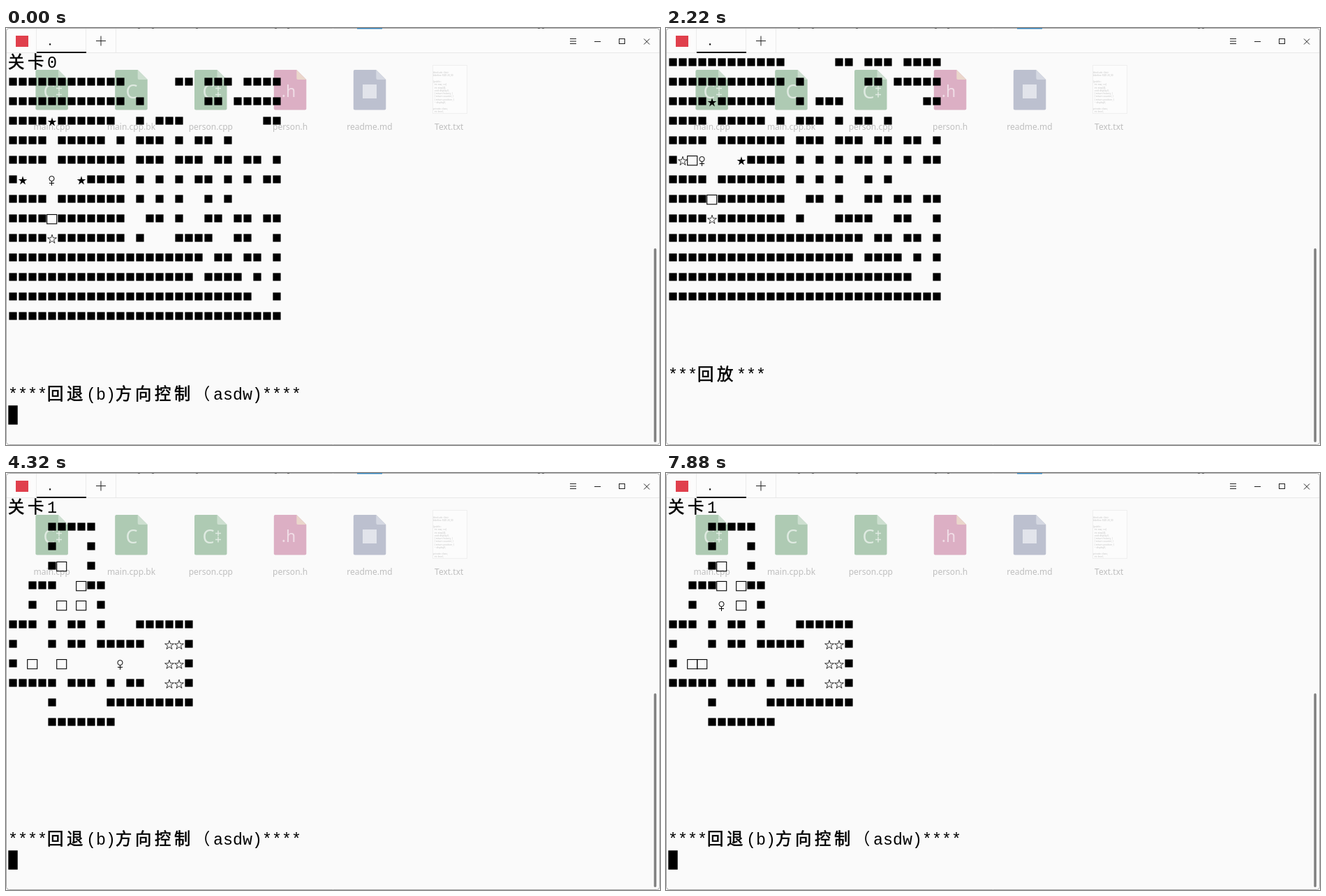
These frames come from a looping animation (937x598 px, 8 s). An HTML page with a canvas:

```html
<!DOCTYPE html>
<html lang="zh">
<head>
<meta charset="utf-8">
<style>
html, body { margin: 0; width: 100%; height: 100%; overflow: hidden; background: #fafafa; }
canvas { display: block; width: 937px; height: 598px; }
</style>
</head>
<body>
<canvas id="stage" width="937" height="598"></canvas>
<script>
const LOOP = 8000, CELL = 14, LINE = 28, LEFT = 3, TOP = 37;
const ctx = document.getElementById('stage').getContext('2d');

// # wall, * goal, $ box, @ player
const LEVELS = [[
  '############     ## ### ####',
  '############ #      ## #####',
  '####*######  # ###        ##',
  '####$##### # ### # ## #',
  '#### ####### ### ### ## ## #',
  '#*$ @ $*#### # # # ## # # ##',
  '#### ####### # # #  # #',
  '####$#######  ## #  ## ## ##',
  '####*####### #   ####  ##  #',
  '#################### ## ## #',
  '################### #### # #',
  '#########################  #',
  '############################'
], [
  '    #####',
  '    #   #',
  '    #$  #',
  '  ###  $##',
  '  #  $ $ #',
  '### # ## #   ######',
  '#   # ## #####  **#',
  '# $  $          **#',
  '##### ### #@##  **#',
  '    #     #########',
  '    #######'
]];
const SOLVED_PART = 'UUDDRRLLLLRR';
const DIRS = { U: [-1, 0], D: [1, 0], L: [0, -1], R: [0, 1] };

// [time, scene or move]
const STEPS = [
  [0, 'play0'], [130, 'D'],
  [510, 'replay'], [550, 'U'], [760, 'U'], [970, 'D'], [1180, 'D'],
  [1390, 'R'], [1600, 'R'], [1810, 'L'], [2020, 'L'], [2220, 'L'],
  [2430, 'L'], [2640, 'R'], [2810, 'R'], [3060, 'D'],
  [3270, 'play1'], [4320, 'U'], [4500, 'L'], [4690, 'L'], [4870, 'L'],
  [5160, 'L'], [5400, 'L'], [5620, 'L'], [6040, 'L'],
  [7370, 'R'], [7540, 'U'], [7710, 'U'], [7880, 'U']
];
const CURSOR_OFF = [[1010, 1600], [2180, 2810], [3380, 3980], [6580, 7030]];

function load(level, replay) {
  const game = { level, replay, map: LEVELS[level], boxes: [], player: null };
  game.map.forEach((row, r) => [...row].forEach((ch, c) => {
    if (ch === '$') game.boxes.push([r, c]);
    if (ch === '@') game.player = [r, c];
  }));
  return game;
}

function move(game, key) {
  const [dr, dc] = DIRS[key], p = game.player;
  p[0] += dr; p[1] += dc;
  const box = game.boxes.find(b => b[0] === p[0] && b[1] === p[1]);
  if (box) { box[0] += dr; box[1] += dc; }
}

function gameAt(t) {
  let game;
  for (const [time, what] of STEPS) {
    if (time > t) break;
    if (what === 'play0') {
      game = load(0, false);
      for (const key of SOLVED_PART) move(game, key);
    } else if (what === 'replay') game = load(0, true);
    else if (what === 'play1') game = load(1, false);
    else move(game, what);
  }
  return game;
}

function rect(x, y, w, h, color) {
  ctx.fillStyle = color;
  ctx.fillRect(x, y, w, h);
}

function path(points, color, width = 1) {
  ctx.beginPath();
  points.forEach(([x, y], i) => i ? ctx.lineTo(x, y) : ctx.moveTo(x, y));
  ctx.strokeStyle = color;
  ctx.lineWidth = width;
  ctx.stroke();
}

function plus(x, y, r, color, width) {
  path([[x - r, y], [x + r, y]], color, width);
  path([[x, y - r], [x, y + r]], color, width);
}

function label(text, x, y, font, color, align = 'center') {
  ctx.font = font;
  ctx.fillStyle = color;
  ctx.textAlign = align;
  ctx.fillText(text, x, y);
}

function page(x, color, fold) {
  const right = x + 46.5, bottom = 117.5;
  ctx.beginPath();
  ctx.moveTo(x + 2, 60);
  ctx.lineTo(x + 32.5, 60);
  ctx.lineTo(right, 74);
  ctx.lineTo(right, bottom - 2);
  ctx.quadraticCurveTo(right, bottom, right - 2, bottom);
  ctx.lineTo(x + 2, bottom);
  ctx.quadraticCurveTo(x, bottom, x, bottom - 2);
  ctx.lineTo(x, 62);
  ctx.quadraticCurveTo(x, 60, x + 2, 60);
  ctx.fillStyle = color;
  ctx.fill();
  ctx.beginPath();
  ctx.moveTo(x + 32.5, 60);
  ctx.lineTo(right, 74);
  ctx.lineTo(x + 34.5, 74);
  ctx.quadraticCurveTo(x + 32.5, 74, x + 32.5, 72);
  ctx.fillStyle = fold;
  ctx.fill();
}

function drawFiles() {
  const green = '#aecab3', paleGreen = '#cddfd0', ink = '#dfeae1';
  [42.4, 156.2, 270].forEach(x => page(x, green, paleGreen));
  page(383.8, '#dcafc4', '#ead6cb');
  page(497.8, '#bcc0cf', '#d5d8e2');
  [62, 180, 290].forEach(x => label('C', x, 101, '27px "Noto Sans", sans-serif', ink));
  [76, 304].forEach(x => [86.5, 95.5].forEach(y => plus(x, y, 4, ink, 1.5)));
  label('.h', 405, 99, '23px "Noto Sans", sans-serif', '#f0dde6');
  rect(511, 81, 20, 20, '#e2e4eb');

  rect(611, 53, 49, 69, '#fcfcfc');
  ctx.strokeStyle = '#efefef';
  ctx.lineWidth = 1;
  ctx.strokeRect(611.5, 53.5, 49, 69);
  ['#include <list>', '#define SIZE 20,30', '', '{public:', '  int row, col;', '  int step[4];',
   '  void display();', '  { return history; }', '  { return counter; }', '  { return position; }',
   '  ~ display();', '', 'private: class;', '  int level;']
    .forEach((s, i) => label(s, 612, 65 + i * 4.3, '3.3px "Noto Sans", sans-serif', '#c4c4c4', 'left'));

  ['main.cpp', 'main.cpp.bk', 'person.cpp', 'person.h', 'readme.md', 'Text.txt']
    .forEach((s, i) => label(s, 65.7 + i * 113.8, 146, '12px "Noto Sans", sans-serif', '#bfbfbf'));
}

function drawWindow() {
  rect(0, 0, 937, 598, '#fafafa');
  rect(0, 0, 937, 35, '#fcfcfc');
  rect(0, 35, 937, 1, '#e8e8e8');
  [43, 114, 157].forEach(x => rect(x, 1, 1, 34, '#ebebeb'));
  rect(44, 34, 71, 2, '#000');
  rect(14, 11, 18, 16, '#e03f4c');
  rect(62, 22.3, 2.2, 2.2, '#111');

  const ink = '#222';
  plus(136, 18.5, 7, ink);
  [15.5, 19, 22.5].forEach(y => path([[808, y], [817, y]], ink));
  path([[843, 19.5], [852, 19.5]], ink);
  ctx.strokeRect(878.5, 15.5, 8, 7);
  path([[914, 15.5], [922, 23.5]], ink);
  path([[922, 15.5], [914, 23.5]], ink);

  drawFiles();

  ctx.beginPath();
  ctx.roundRect(928.3, 316, 3.5, 278, 1.7);
  ctx.fillStyle = '#808080';
  ctx.fill();

  ctx.beginPath();
  ctx.roundRect(0.5, 0.5, 936, 597, 4);
  ctx.strokeStyle = '#a8a8a8';
  ctx.lineWidth = 1;
  ctx.stroke();
  rect(503, 0, 36, 1.4, '#2f7fb8');
  [189, 209, 272, 385, 403, 762, 768].forEach(x => rect(x, 0, 3, 1, '#555'));
}

function terminalText(text, line) {
  let x = LEFT;
  const y = TOP + LINE * line + 20;
  for (const ch of text) {
    const wide = ch.charCodeAt(0) > 255;
    const font = wide ? '23.33px "Noto Sans CJK SC", "Noto Sans CJK", sans-serif'
                      : '23.33px "Liberation Mono", monospace';
    label(ch, x, y, font, '#000', 'left');
    if (wide && ch !== '（') {
      ctx.strokeStyle = '#000';
      ctx.lineWidth = 0.6;
      ctx.strokeText(ch, x, y);
    }
    x += wide ? CELL * 2 : CELL;
  }
}

function star(x, y, filled) {
  ctx.beginPath();
  for (let i = 0; i < 10; i++) {
    const radius = (i % 2 ? 0.382 : 1) * 6.7, a = i * Math.PI / 5;
    ctx.lineTo(x + 7 + radius * Math.sin(a), y + 14 - radius * Math.cos(a));
  }
  ctx.closePath();
  ctx.fillStyle = ctx.strokeStyle = '#000';
  ctx.lineWidth = 0.8;
  filled ? ctx.fill() : ctx.stroke();
}

function player(x, y) {
  ctx.beginPath();
  ctx.arc(x + 6.5, y + 11, 3.6, 0, Math.PI * 2);
  ctx.strokeStyle = '#000';
  ctx.lineWidth = 1;
  ctx.stroke();
  path([[x + 6.5, y + 14.6], [x + 6.5, y + 21]], '#000');
  path([[x + 3, y + 17.5], [x + 10, y + 17.5]], '#000');
}

function drawGame(game, cursorOn) {
  const first = game.replay ? 0 : 1;
  const place = (r, c) => [LEFT + c * CELL, TOP + (r + first) * LINE];
  if (!game.replay) terminalText('关卡' + game.level, 0);

  game.map.forEach((row, r) => [...row].forEach((ch, c) => {
    const [x, y] = place(r, c);
    if (ch === '#') rect(x + 1.4, y + 6.4, 11.2, 11.2, '#000');
    if (ch === '*') star(x, y, game.boxes.some(b => b[0] === r && b[1] === c));
  }));
  for (const [r, c] of game.boxes) {
    if (game.map[r][c] === '*') continue;
    const [x, y] = place(r, c);
    ctx.strokeStyle = '#000';
    ctx.lineWidth = 1.1;
    ctx.strokeRect(x - 0.3, y + 6.5, 14, 13.3);
  }
  player(...place(...game.player));

  const footer = 16 + first;
  terminalText(game.replay ? '***回放***' : '****回退(b)方向控制（asdw)****', footer);
  if (cursorOn) rect(LEFT + 0.3, TOP + (footer + 1) * LINE + 0.3, CELL - 0.6, LINE - 0.6, '#000');
}

const start = performance.now();
function frame() {
  const t = (performance.now() - start) % LOOP;
  drawWindow();
  drawGame(gameAt(t), !CURSOR_OFF.some(([from, to]) => t >= from && t < to));
  requestAnimationFrame(frame);
}
frame();
</script>
</body>
</html>
```
